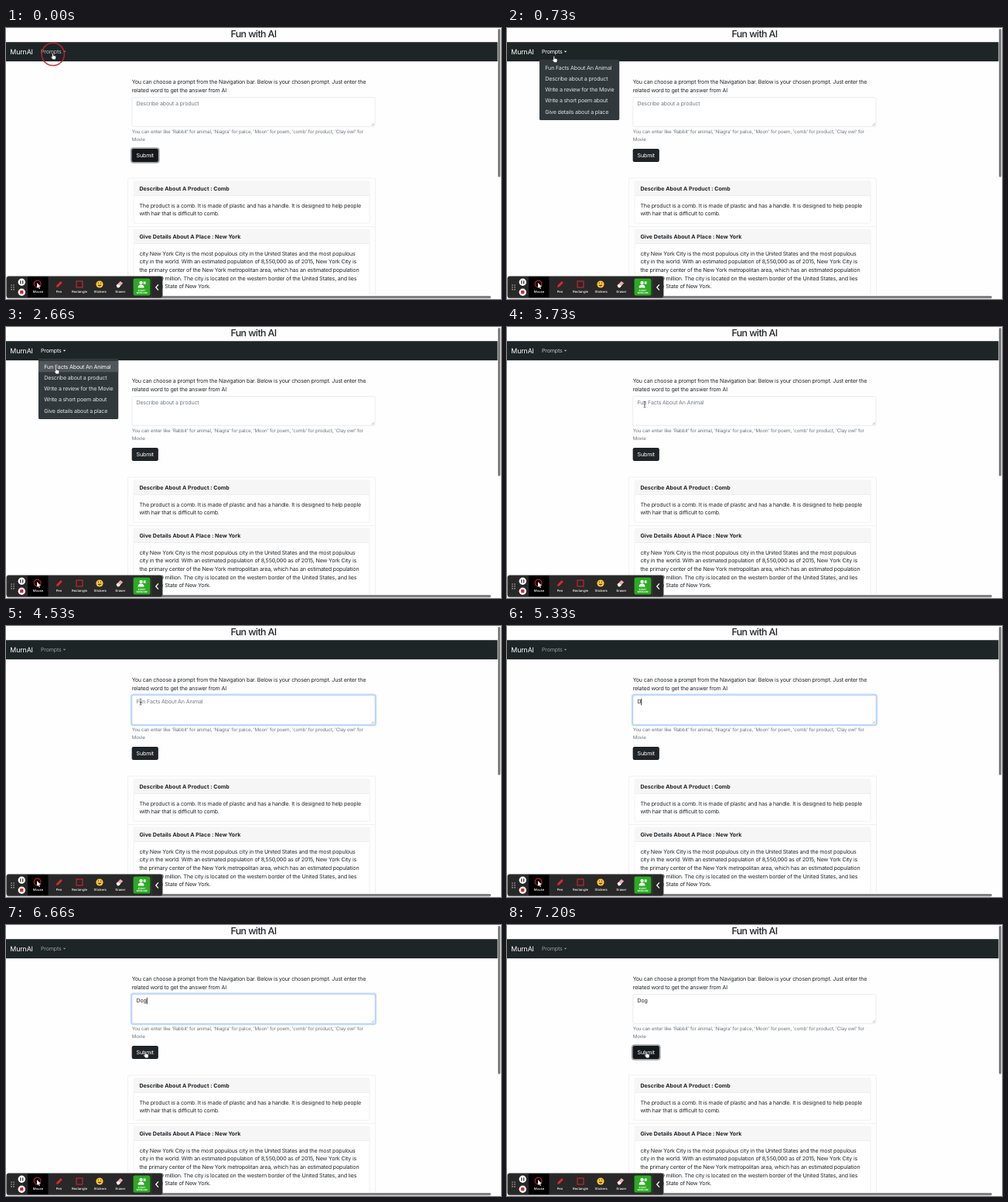
Write an HTML page that moves like this. It is 640 px wide and 350 px high and loops after 8 s.

```html
<!DOCTYPE html>
<html lang="en">
<head>
<meta charset="utf-8">
<title>Fun with AI</title>
<style>
html, body { margin: 0; width: 100%; height: 100%; overflow: hidden; background: #fff; }
* { box-sizing: border-box; }
#page {
  position: absolute; left: 0; top: 0; width: 1440px; height: 787.5px; overflow: hidden;
  transform: scale(.444444); transform-origin: 0 0;
  font: 16px/24px Inter, "Liberation Sans", sans-serif; font-optical-sizing: none;
  text-rendering: geometricPrecision;
  letter-spacing: -.025em; color: #212529; white-space: nowrap; background: #fefefe;
}
#page > * { position: absolute; }
h3 { margin: 0; top: 0; width: 100%; text-align: center; font-size: 28px; line-height: 33.6px; font-weight: 500; letter-spacing: -.05em; }
nav { top: 41px; width: 100%; height: 56px; background: #1e2527; color: #fff; line-height: 56px; }
nav > * { position: absolute; }
.brand { left: 12px; font-size: 20px; }
#link { left: 101px; }
#link::after {
  content: ""; display: inline-block; margin-left: 5px; vertical-align: 4px;
  border: 4.8px solid transparent; border-top-color: currentColor; border-bottom: 0;
}
#menu { left: 94px; top: 91px; width: 233px; height: 177px; padding: 8px 0; border-radius: 4px; background: #31383c; color: #dee2e6; will-change: opacity; }
#menu div { height: 32px; padding: 4px 17px; }
#menu .on { background: #50565a; color: #fff; }
.lead { left: 366px; top: 145px; }
#field { left: 366px; top: 201px; width: 708px; height: 86px; padding: 6px 12px; border: 1px solid #ced4da; border-radius: 5px; background: #fff; }
#field.focus { border-color: #86b7fe; box-shadow: 0 0 0 4px rgba(13,110,253,.25); }
#field.empty #text { color: #757c83; }
#field svg { position: absolute; right: 1px; bottom: 1px; }
#caret { position: absolute; top: 9px; width: 1.6px; height: 19px; background: #111; }
.help { left: 366px; top: 288.5px; font-size: 14px; letter-spacing: -.022em; color: #6c757d; }
#send { left: 366px; top: 351px; width: 77px; height: 38px; border-radius: 5px; background: #1e2428; color: #fff; text-align: center; line-height: 38px; }
#send.focus { background: #15181b; box-shadow: 0 0 0 4px rgba(66,70,73,.5); }
.list { left: 354px; top: 436px; width: 721px; height: 400px; border: 1px solid #dfdfdf; border-radius: 4px; }
.item { padding: 8px 16px; border-bottom: 1px solid #dfdfdf; }
.card { border: 1px solid #dfdfdf; border-radius: 4px; background: #fff; }
.card b { display: block; padding: 8px 16px; border-bottom: 1px solid #dfdfdf; background: #f6f6f6; letter-spacing: 0; }
.card p { margin: 0; padding: 16px; }
#over { position: absolute; left: 0; top: 0; text-rendering: geometricPrecision; }
#over text { font: 500 4.2px Inter, "Liberation Sans", sans-serif; fill: #fff; text-anchor: middle; }
#over .tiny { font-size: 3px; font-weight: 700; }
</style>
</head>
<body>
<div id="page">
  <h3>Fun with AI</h3>
  <nav><span class="brand">MurnAI</span><span id="link">Prompts</span></nav>
  <div class="lead">You can choose a prompt from the Navigation bar. Below is your chosen prompt. Just enter the<br>related word to get the answer from AI</div>
  <div id="field"><span id="text"></span><i id="caret"></i>
    <svg width="10" height="10" stroke="#888" stroke-width="1.2"><path d="M1 9L9 1M5 9L9 5"/></svg>
  </div>
  <div class="help">You can enter like 'Rabbit' for animal, 'Niagra' for palce, 'Moon' for poem, 'comb' for product, 'Clay owl' for<br>Movie</div>
  <div id="send">Submit</div>
  <div class="list">
    <div class="item"><div class="card"><b>Describe About A Product : Comb</b>
      <p>The product is a comb. It is made of plastic and has a handle. It is designed to help people<br>with hair that is difficult to comb.</p></div></div>
    <div class="item"><div class="card"><b>Give Details About A Place : New York</b>
      <p>city New York City is the most populous city in the United States and the most populous<br>city in the world. With an estimated population of 8,550,000 as of 2015, New York City is<br>the primary center of the New York metropolitan area, which has an estimated population<br>of over 19 million. The city is located on the western border of the United States, and lies<br>within the State of New York.</p></div></div>
  </div>
  <div id="menu">
    <div>Fun Facts About An Animal</div>
    <div>Describe about a product</div>
    <div>Write a review for the Movie</div>
    <div>Write a short poem about</div>
    <div>Give details about a place</div>
  </div>
</div>

<svg id="over" width="640" height="350" viewBox="0 0 640 350" fill="none">
  <path d="M635.5 0H640V350H0V345.2H635.5z" fill="#fdfdfd"/>
  <g fill="#7f7f7f">
    <rect x="636" y="1" width="3.2" height="191.5" rx="1.6"/>
    <rect x="1" y="346" width="626" height="3.2" rx="1.6"/>
  </g>
  <g id="tools">
    <rect x=".8" y="320.8" width="201.4" height="27.4" rx="2.5" fill="#282828" stroke="#444" stroke-width=".6"/>
    <rect x="28" y="321.2" width="26.5" height="26.6" fill="#000"/>
    <path d="M7 331.5v7M10 331.5v7" stroke="#bbb" stroke-width="1.3" stroke-dasharray="1.3 1.5"/>
    <circle cx="20.3" cy="328.3" r="4.7" fill="#fff"/>
    <path d="M18.9 326.2v4.2M21.7 326.2v4.2" stroke="#222" stroke-width="1.2"/>
    <circle cx="20.3" cy="341.2" r="4.7" fill="#fff"/>
    <rect x="18.2" y="339.1" width="4.2" height="4.2" rx=".6" fill="#d8232f"/>
    <circle cx="40.6" cy="330.6" r="4.4" stroke="#d8232f" stroke-width="1.1"/>
    <path d="M40 329v7l1.7-1.5 1.1 2.4 1.1-.5-1.1-2.3h2.2z" fill="#fff"/>
    <path d="M65 335l.7-2.7 5-5.3 2.1 2-5 5.3z" fill="#e0262f"/>
    <rect x="91" y="327" width="8" height="8" stroke="#d8232f" stroke-width="1.1"/>
    <circle cx="121" cy="331" r="4.6" fill="#fcc737"/>
    <path d="M118.4 331.8q2.6 4 5.2 0z" fill="#6b3a12"/>
    <path d="M119.4 328.6v1.4M122.6 328.6v1.4" stroke="#6b3a12"/>
    <path d="M142.6 332.6l5.2-5.6 3.4 2.6-5.2 5.6h-2z" fill="#f2a9b0"/>
    <path d="M142.6 332.6l1.8-1.9 3.4 2.6-1.8 1.9h-2z" fill="#fff"/>
    <rect x="164.6" y="323.4" width="21.8" height="22.2" rx="2.2" fill="#2bab22"/>
    <circle cx="174.6" cy="329" r="2.2" fill="#fff"/>
    <path d="M170.6 335.6q0-4 4-4t4 4z" fill="#fff"/>
    <path d="M177.8 327.4h2.8v3.4h-2.8z" fill="#fff"/>
    <text class="tiny" x="175.5" y="339.7">START</text><text class="tiny" x="175.5" y="343.3">WEBCAM</text>
    <path d="M188 321.4v26.4" stroke="#444" stroke-width=".6"/>
    <path d="M197 331.4l-3.2 3.6 3.2 3.6" stroke="#fff" stroke-width="1.3"/>
  </g>
  <circle id="ring" r="14.6" stroke="#c2222e" stroke-width="1.6"/>
  <g id="cursor">
    <path id="hand" d="M-.8.7a.8.8 0 0 1 1.6 0V3.2Q1.6 2.7 2 3.3Q2.8 2.9 3.2 3.6Q4.2 3.4 4.2 4.4V6Q4 7.4 3.4 8.3H.2Q-.6 7-2.2 5.2Q-2.4 4.2-1.5 4.4L-.8 5Z" fill="#fff" stroke="#111" stroke-width=".5"/>
    <path id="beam" d="M-1.4-4Q0-4 0-3V3Q0 4-1.4 4M1.4-4Q0-4 0-3M0 3Q0 4 1.4 4M-1 .8h2" stroke="#444" stroke-width=".7"/>
    <path id="arrow" d="M0 0V7.6L1.8 6 2.9 8.5 4 8 3 5.6H5.4Z" fill="#111" stroke="#fff" stroke-width=".5"/>
  </g>
</svg>

<script>
const LOOP = 8000;
const $ = id => document.getElementById(id);
const show = (el, on) => { el.style.display = on ? '' : 'none'; };
const within = (v, a, b) => v >= a && v < b;

// time, x, y
const PATH = [
  [0, 60.3, 32.5], [600, 60.3, 32.5], [730, 60.8, 36.3], [1000, 64, 56], [1400, 70, 70],
  [1530, 71, 76], [2400, 71, 76], [2660, 64.6, 52.4], [3200, 64.6, 52.4], [3730, 178, 100],
  [3800, 178, 100], [3930, 174, 98], [6100, 174, 98], [6660, 180, 163.4], [LOOP, 180, 163.4]
];
const CLICKS = [[0, 260], [2930, 3200], [4130, 4400], [6730, 7060]];
const KEYS = [[5270, 'D'], [5470, 'Do'], [5660, 'Dog']];
const OPEN = 60, CLOSE = 3130, FOCUS = 4130, BLUR = 6800;

const labels = [['Mouse', 41.5], ['Pen', 68.5], ['Rectangle', 95], ['Stickers', 121.7], ['Eraser', 148]];
for (const [name, x] of labels) {
  const el = document.createElementNS('http://www.w3.org/2000/svg', 'text');
  el.setAttribute('x', x);
  el.setAttribute('y', 342.4);
  el.textContent = name;
  $('tools').append(el);
}

function pointer(t) {
  const i = PATH.findIndex(p => p[0] > t);
  const [t0, x0, y0] = PATH[i - 1], [t1, x1, y1] = PATH[i];
  const u = (t - t0) / (t1 - t0), k = u * u * (3 - 2 * u);
  return [x0 + (x1 - x0) * k, y0 + (y1 - y0) * k];
}

function caretOn(t, key) {
  if (!within(t, FOCUS, BLUR)) return false;
  return key ? (t - key[0]) % 1000 < 500 : !within(t, 4530, 5000);
}

function draw(t) {
  const [x, y] = pointer(t);
  const open = within(t, OPEN, CLOSE);
  const key = KEYS.filter(k => k[0] <= t).pop();

  $('menu').style.opacity = open ? 1 : 0;
  const row = open ? Math.floor((y - 44) / 14.22) : -1;
  [...$('menu').children].forEach((el, i) => el.classList.toggle('on', i === row));
  $('link').style.color = `rgba(255,255,255,${open ? 1 : t < FOCUS ? .72 : .55})`;

  $('field').className = (within(t, FOCUS, BLUR) ? 'focus' : '') + (key ? '' : ' empty');
  $('text').textContent = key ? key[1] : t < CLOSE ? 'Describe about a product' : 'Fun Facts About An Animal';
  show($('caret'), caretOn(t, key));
  $('caret').style.left = 12 + (key ? $('text').offsetWidth : 0) + 'px';
  $('send').className = t < OPEN || t >= BLUR ? 'focus' : '';

  const click = CLICKS.find(c => within(t, c[0], c[1]));
  show($('ring'), click);
  if (click) {
    $('ring').setAttribute('cx', x + .5);
    $('ring').setAttribute('cy', y + 1.4);
    $('ring').style.opacity = Math.min(.9, (click[1] - t) / 90);
  }

  const beam = within(x, 163, 477) && within(y, 90, 127);
  const hand = open || y < 43 || (within(x, 163, 197) && within(y, 156, 173));
  show($('cursor'), !within(t, KEYS[0][0], 6100));
  $('cursor').setAttribute('transform', `translate(${x} ${y})`);
  show($('beam'), beam);
  show($('hand'), hand && !beam);
  show($('arrow'), !hand && !beam);
}

const start = performance.now();
function tick() {
  draw((performance.now() - start) % LOOP);
  requestAnimationFrame(tick);
}
tick();
</script>
</body>
</html>
```
